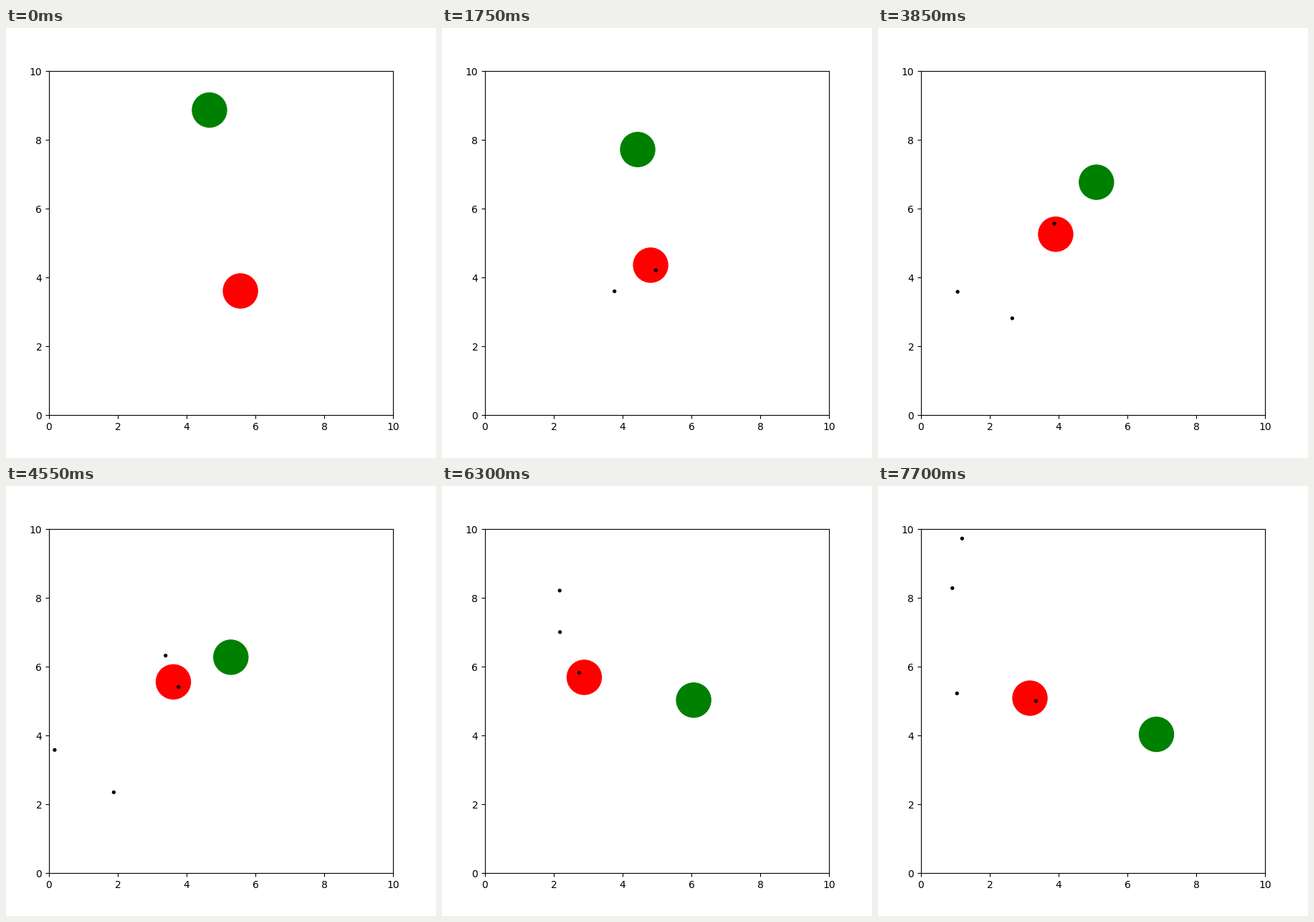
These frames come from a looping animation (600 by 600 pixels, 8000 ms). A matplotlib script:

```python
import matplotlib.pyplot as plt
import numpy as np
from matplotlib.animation import FuncAnimation

TICK = 50       # ms per drawn frame
HOLD = 7        # drawn frames per simulation step
FRAMES = 160
SPEED = 0.45    # bullet speed per step
RELOAD = 4      # steps between shots

# Turning points: step, x, y
RED = [(0, 5.565, 3.606), (15.9, 3.18, 5.991), (18, 2.885, 5.688),
       (20, 3.106, 5.383), (22, 3.167, 5.083)]
GREEN = [(0, 4.665, 8.865), (1, 4.525, 8.621), (4.75, 4.417, 7.746),
         (9, 4.787, 7.254), (11, 5.1, 6.767), (13, 5.287, 6.273),
         (15, 5.662, 5.777), (17, 5.871, 5.275), (22, 6.844, 4.031)]
HEADINGS = np.radians([180.3, 211.1, 122.8, 134.8, 199.6, -58.4][:]) * -1


def along(path, step):
    """Position at a step when moving straight between turning points."""
    t, x, y = zip(*path)
    return np.array([np.interp(step, t, x), np.interp(step, t, y)])


def bullet(n, step):
    """Position of shot n, or None while it is not on the field."""
    age = step - 1 - RELOAD * n
    if age < 0:
        return None
    way = np.array([np.cos(HEADINGS[n]), -np.sin(HEADINGS[n])])
    pos = along(RED, RELOAD * n) + SPEED * age * way
    return pos if np.all((pos >= 0) & (pos <= 10)) else None


fig = plt.figure(figsize=(6, 6), dpi=100)
ax = fig.add_axes([0.1, 0.1, 0.8, 0.8])
ax.set(xlim=(0, 10), ylim=(0, 10))


def disc(radius, color, layer):
    return ax.add_patch(plt.Circle((0, 0), radius, color=color, zorder=layer))


red = disc(0.5, "red", 1)
green = disc(0.5, "green", 1)
dots = [disc(0.04, "black", 2) for _ in HEADINGS]


def update(frame):
    step = frame // HOLD
    red.center = along(RED, step)
    green.center = along(GREEN, step)
    for n, dot in enumerate(dots):
        pos = bullet(n, step)
        dot.set_visible(pos is not None)
        if pos is not None:
            dot.center = pos
    return red, green, *dots


anim = FuncAnimation(fig, update, frames=FRAMES, interval=TICK,
                     repeat=True, repeat_delay=0)
plt.show()
```
